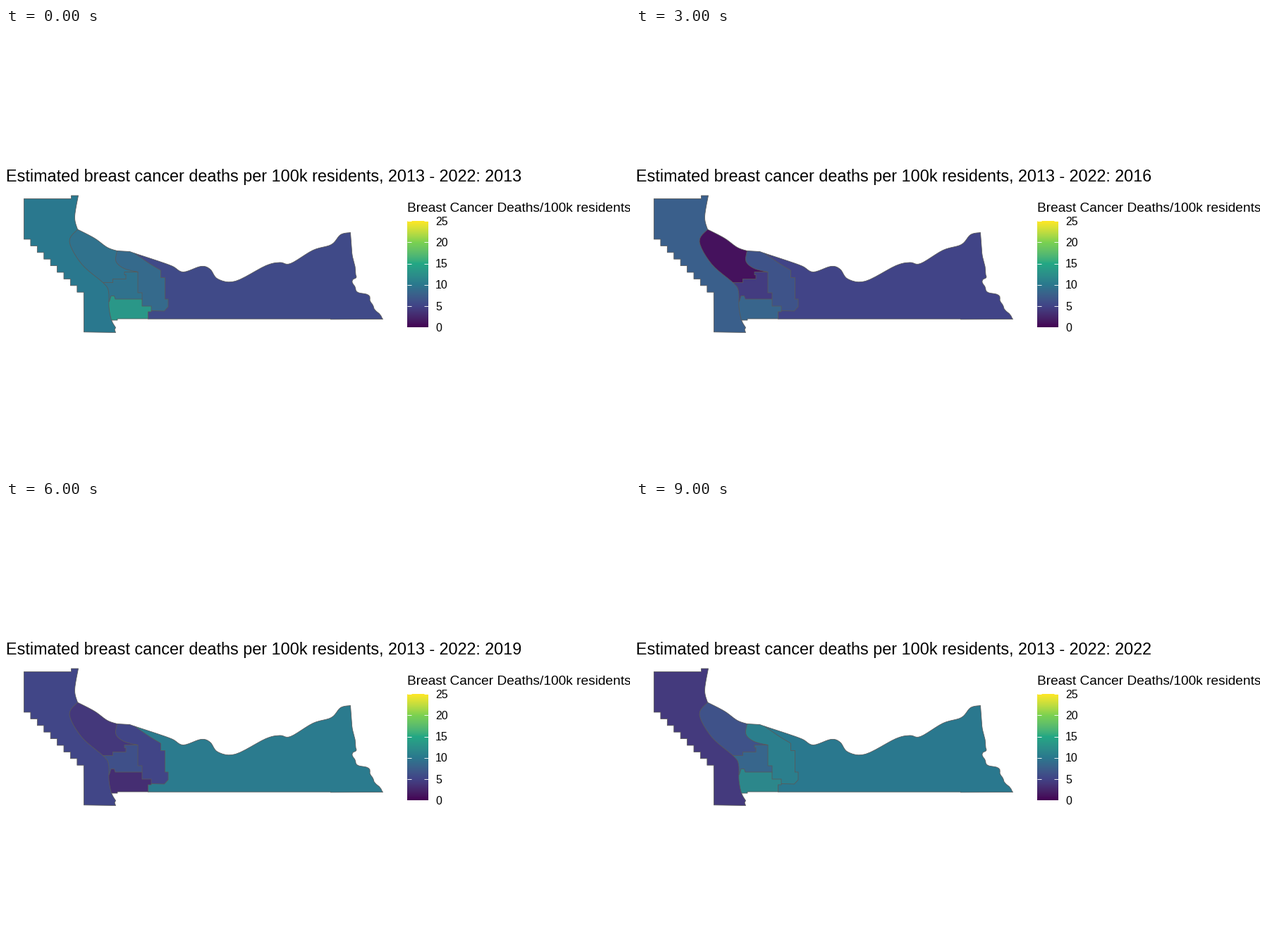
Animation, 885 px wide and 632 px high, one loop 10000 ms. Source, as a matplotlib script:

```python
import numpy as np
import matplotlib.pyplot as plt
from matplotlib.animation import FuncAnimation
from matplotlib.colors import ListedColormap, to_rgb
from matplotlib.patches import Polygon

W, H, DPI = 885, 632, 100
PX = 72 / DPI  # points per pixel
FONT = "Liberation Sans"
VMAX = 25


# Colour scale: six stops blended in CIE Lab
TO_XYZ = np.array([[0.4124, 0.3576, 0.1805],
                   [0.2126, 0.7152, 0.0722],
                   [0.0193, 0.1192, 0.9505]])
WHITE = TO_XYZ.sum(axis=1)
STOPS = ["#440154", "#414487", "#2a788e", "#22a884", "#7ad151", "#fde725"]


def rgb_to_lab(rgb):
    rgb = np.asarray(rgb)
    lin = np.where(rgb > 0.04045, ((rgb + 0.055) / 1.055) ** 2.4, rgb / 12.92)
    t = lin @ TO_XYZ.T / WHITE
    fx, fy, fz = np.where(t > 0.008856, np.cbrt(t), 7.787 * t + 16 / 116).T
    return np.array([116 * fy - 16, 500 * (fx - fy), 200 * (fy - fz)])


def lab_to_rgb(l, a, b):
    fy = (l + 16) / 116
    f = np.stack([fy + a / 500, fy, fy - b / 200], axis=1)
    t = np.where(f > 0.2069, f ** 3, (f - 16 / 116) / 7.787)
    lin = np.clip((t * WHITE) @ np.linalg.inv(TO_XYZ).T, 0, 1)
    return np.where(lin > 0.0031308, 1.055 * lin ** (1 / 2.4) - 0.055,
                    12.92 * lin).clip(0, 1)


def make_scale(n=512):
    lab = rgb_to_lab([to_rgb(c) for c in STOPS])
    at = np.linspace(0, len(STOPS) - 1, n)
    return ListedColormap(lab_to_rgb(*(np.interp(at, range(len(STOPS)), ch)
                                       for ch in lab)))


SCALE = make_scale()


# Border builders, in pixel coordinates
def curve(*keys, n=6):
    """Smooth line through the key points."""
    p = np.array([keys[0], *keys, keys[-1]], float)
    t = np.linspace(0, 1, n, endpoint=False)[:, None]
    parts = [b + 0.5 * t * (c - a + t * (2 * a - 5 * b + 4 * c - d
                                         + t * (3 * (b - c) + d - a)))
             for a, b, c, d in zip(p, p[1:], p[2:], p[3:])]
    return [*map(tuple, np.vstack(parts)), tuple(map(float, keys[-1]))]


def steps(start, *moves):
    """Survey line of alternating horizontal and vertical moves."""
    x, y = start
    pts = [start]
    for k, move in enumerate(moves):
        x, y = (x, y + move) if k % 2 else (x + move, y)
        pts.append((x, y))
    return pts


def wavy(pts, size, pitch):
    """Small bends of a river bank along a mostly vertical line."""
    return [(x + size * np.sin(2 * np.pi * y / pitch), y) for x, y in pts]


coast = curve((182, 319.5), (217, 331), (236, 338), (251, 346), (276, 338),
              (289, 342), (300, 356), (325, 359), (368, 337), (388, 332.5),
              (403, 334), (435, 315), (461, 307), (474, 293), (488, 290))
river = wavy(curve((489, 314), (496, 350), (491, 358), (498, 374), (513, 379),
                   (520, 395), (535, 413)), 1, 13)
stairs = steps((25, 299.5), *[9.42, 9.4] * 8, 9.42)

# Painted in this order: each region covers the loose inner ends of earlier ones
east = coast + river + [(460, 413.3), (460, 412.7), (201, 412.7), (201, 345)]
strip = ([(157, 316), (175, 317)]
         + curve((182, 319.5), (203, 334), (218, 343))
         + steps((219, 344), 0, 10, 6, 30.5, 4.5, 11)
         + [(224, 401.5), (206, 401), (180, 400), (160, 380), (150, 330)])
south = ([(140, 375), (170, 375)]
         + steps((192.5, 384.5), 0, 10, 13, 8, -4.5, 10, -43.5, 2, -20))
middle = ([(140, 346)] + steps((186.5, 346), 0, 29.5, 6, 9, -38)
          + [(153, 380), (148.5, 380), (146, 388), (135, 385)])
north = (curve((101, 285.5), (125, 298), (143, 311), (157, 316))
         + curve((157, 316), (155.5, 331), (167, 341), (186.5, 346))
         + steps((186.5, 346), -19, 4, 2, 6, -18.5, 5, -30)
         + [(85, 310), (85, 290)])
west = (steps((25, 242), 67, -4.5, 10)
        + curve((102, 237.5), (97, 268), (101, 285.5))
        + curve((101, 285.5), (89.5, 303), (107, 335), (138, 362), (145, 374),
                (145.5, 396), (149, 414), (155, 425))
        + [(153.5, 428), (155, 432), (110, 431.3)] + stairs[::-1])
REGIONS = [east, strip, south, middle, north, west]

# Key rates in the order of REGIONS; years between are interpolated
KEYS = {
    2013: (5.6, 8.6, 13.2, 9.4, 9.4, 10),
    2015: (10, 14, 6.2, 6.8, 9.3, 10.4),
    2016: (5, 6.4, 8.2, 4.3, 0.9, 7.6),
    2017: (7.6, 9.4, 6.3, 8.5, 4.7, 5.1),
    2019: (10.3, 5.1, 3, 6.2, 3.9, 5.2),
    2020: (4.1, 7, 5, 7.6, 2.6, 5.5),
    2021: (4.1, 5.9, 5, 9.1, 1.2, 5.9),
    2022: (10, 10.7, 11.6, 8.3, 6.3, 4.1),
}
TRACKS = list(zip(*KEYS.values()))
FIRST, LAST = min(KEYS), max(KEYS)

fig = plt.figure(figsize=(W / DPI, H / DPI), dpi=DPI, facecolor="white")
ax = fig.add_axes([0, 0, 1, 1])
ax.axis("off")


def label(x, y, text, size):
    return ax.text(x, y, text, family=FONT, fontsize=size * PX, color="black",
                   ha="left", va="baseline")


shapes = [ax.add_patch(Polygon(pts, closed=True, edgecolor="#595959",
                               linewidth=0.8 * PX, joinstyle="round"))
          for pts in REGIONS]

# Legend
X0, X1, TOP, BASE = 568.5, 598.5, 273.7, 424.7
label(X0, 260.8, "Breast Cancer Deaths/100k residents", 19.2)
ax.imshow(np.linspace(1, 0, 300)[:, None], cmap=SCALE, vmin=0, vmax=1,
          extent=(X0, X1, BASE, TOP), aspect="auto", interpolation="nearest")
for v in range(0, VMAX + 1, 5):
    y = BASE + (TOP - BASE) * v / VMAX
    for a, b in ((X0, X0 + 6), (X1 - 6, X1)):
        ax.plot([a, b], [y, y], color="white", lw=0.9 * PX,
                solid_capstyle="butt")
    label(608.5, y + 5.6, str(v), 16)

title = label(-0.5, 217.1, "", 23.4)
# Whole numbers fall on pixel centres
ax.set(xlim=(-0.5, W - 0.5), ylim=(H - 0.5, -0.5))


def draw(i):
    year = FIRST + i
    title.set_text("Estimated breast cancer deaths per 100k residents, "
                   f"{FIRST} - {LAST}: {year}")
    for shape, track in zip(shapes, TRACKS):
        shape.set_facecolor(SCALE(np.interp(year, list(KEYS), track) / VMAX))
    return [title, *shapes]


anim = FuncAnimation(fig, draw, frames=LAST - FIRST + 1, interval=1000,
                     repeat=True, repeat_delay=0, init_func=lambda: draw(0),
                     blit=False)
plt.show()
```
